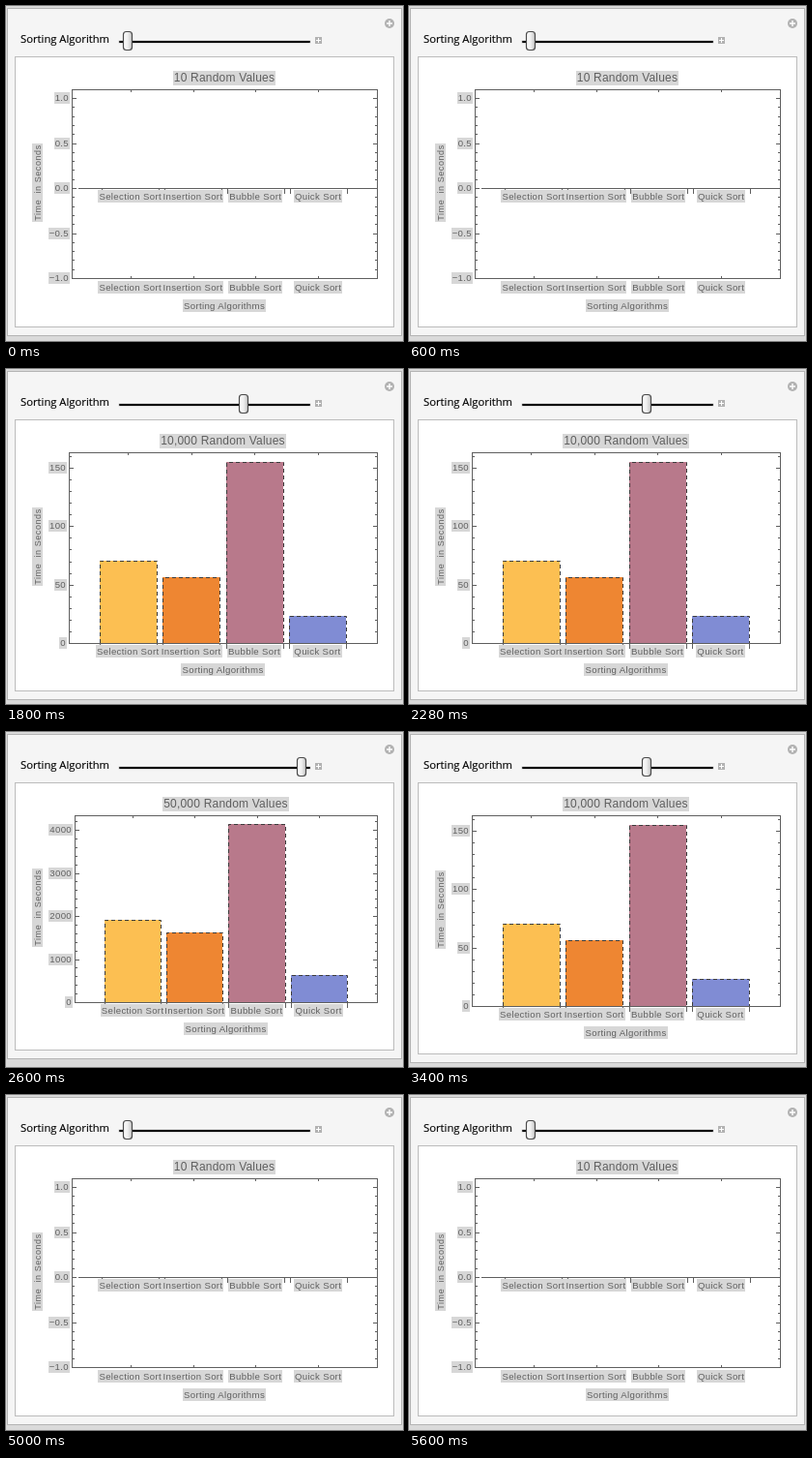
Animation of 411x346 px, one loop 6000 ms. Source, as an HTML page:

```html
<!DOCTYPE html>
<html lang="en">
<head>
<meta charset="utf-8">
<title>Sorting algorithm timings</title>
<style>
  html, body { margin: 0; width: 100%; height: 100%; overflow: hidden; background: #dadada; }
  svg { display: block; width: 411px; height: 346px; }
  text { font-family: "Liberation Sans", Arial, sans-serif; fill: #5f5f5f; white-space: pre; }
  .caption { font: 11.25px "Open Sans", "Noto Sans", sans-serif; fill: #000; stroke: #000; stroke-width: .15px; }
  .scene { visibility: hidden; animation: 6s step-end infinite; }
  .s0 { animation-name: show0; }
  .s1 { animation-name: show1; }
  .s2 { animation-name: show2; }
  .s3 { animation-name: show3; }
  @keyframes show0 {
    0%, 83.3333% { visibility: visible; }
    16.6667% { visibility: hidden; }
    100% { visibility: visible; }
  }
  @keyframes show1 {
    0%, 30%, 83.3333%, 100% { visibility: hidden; }
    16.6667%, 70% { visibility: visible; }
  }
  @keyframes show2 {
    0%, 43.3333%, 70%, 100% { visibility: hidden; }
    30%, 56.6667% { visibility: visible; }
  }
  @keyframes show3 {
    0%, 56.6667%, 100% { visibility: hidden; }
    43.3333% { visibility: visible; }
  }
</style>
</head>
<body>
<svg id="stage" viewBox="0 0 411 346">
  <defs>
    <linearGradient id="knob" x2="1" y2="0">
      <stop offset="0" stop-color="#fff"/>
      <stop offset=".5" stop-color="#eee"/>
      <stop offset="1" stop-color="#c4c4c4"/>
    </linearGradient>
  </defs>
</svg>
<script>
const RIGHT = 384, TOP = 86;
const INK = '#5f5f5f';
const names = ['Selection Sort', 'Insertion Sort', 'Bubble Sort', 'Quick Sort'];
const colors = ['#fcbf52', '#ee8632', '#b8798b', '#808cd4'];

// zero: y of value 0; unit: pixels per value; end: bottom of the white panel
const scenes = [
  { count: '10', knob: 126, left: 68, bottom: 281, end: 331, zero: 188, unit: 93,
    min: -1, max: 1, major: .5, minor: .1, digits: 1, bars: [0, 0, 0, 0] },
  { count: '1000', knob: 186, left: 62, bottom: 284, end: 334, zero: 284, unit: 125.4,
    min: 0, max: 1.55, major: .2, minor: .05, digits: 1, bars: [.7, .56, 1.5, .275] },
  { count: '10,000', knob: 246, left: 65, bottom: 283, end: 332, zero: 283, unit: 1.207,
    min: 0, max: 160, major: 50, minor: 10, digits: 0, bars: [70.5, 56, 155, 23] },
  { count: '50,000', knob: 306, left: 71, bottom: 279, end: 328, zero: 279, unit: .0445,
    min: 0, max: 4300, major: 1000, minor: 200, digits: 0, bars: [1900, 1610, 4125, 625] }
];

function add(parent, tag, attrs) {
  const node = document.createElementNS('http://www.w3.org/2000/svg', tag);
  for (const key in attrs) node.setAttribute(key, attrs[key]);
  return parent.appendChild(node);
}

function box(g, x1, y1, x2, y2, fill, stroke) {
  add(g, 'rect', { x: x1 + .5, y: y1 + .5, width: x2 - x1, height: y2 - y1, fill, stroke });
}

function path(g, d, attrs) {
  return add(g, 'path', { d, fill: 'none', stroke: INK, ...attrs });
}

// Text centred on (x, y), or ending at x, over a grey backdrop
function label(g, str, x, y, { size = 9.6, spacing = .036, end = false, angle = 0 } = {}) {
  const holder = add(g, 'g', angle ? { transform: `rotate(${angle} ${x} ${y})` } : {});
  const text = add(holder, 'text', {
    x, y: y + size * .346, 'font-size': size, 'letter-spacing': spacing * size,
    'text-anchor': end ? 'end' : 'middle'
  });
  text.textContent = str;
  const b = text.getBBox();
  const x1 = Math.round(b.x - 1), x2 = Math.round(b.x + b.width + 1);
  const y1 = Math.round(b.y - .5), y2 = Math.round(b.y + b.height + .8);
  const back = add(holder, 'rect', { x: x1, y: y1, width: x2 - x1, height: y2 - y1, fill: '#d7d7d7' });
  holder.insertBefore(back, text);
}

function drawControls(g, knob) {
  add(g, 'text', { x: 15, y: 38, class: 'caption' }).textContent = 'Sorting Algorithm';
  add(g, 'rect', { x: 116, y: 35, width: 200, height: 4, rx: 2, fill: '#ddd' });
  add(g, 'rect', { x: 117, y: 36, width: 198, height: 2, rx: 1, fill: '#000' });
  add(g, 'rect', { x: 121.5, y: 26.5, width: 9, height: 19, rx: 3, fill: 'url(#knob)',
    stroke: '#4a4a4a', 'stroke-width': 1.2, transform: `translate(${knob - 126})` });
  add(g, 'rect', { x: 320, y: 32, width: 7, height: 7, fill: '#b2b2b2' });
  path(g, 'M321 35.5h5M323.5 33v5', { stroke: '#fff' });
  add(g, 'circle', { cx: 397, cy: 18, r: 5, fill: '#b2b2b2' });
  path(g, 'M394 18h6M397 15v6', { stroke: '#fff', 'stroke-width': 1.4 });
}

function drawChart(g, s) {
  const { left, bottom, zero } = s;
  const width = RIGHT - left, middle = (left + RIGHT) / 2;
  const yOf = value => Math.round(zero - value * s.unit);
  const centers = names.map((_, i) => left + width * (.194 + .205 * i));
  const half = width * .093;
  const edges = centers.map(c => [Math.floor(c - half), Math.floor(c + half)]);

  box(g, left, TOP, RIGHT, bottom, 'none', INK);

  let ticks = '';
  const every = Math.round(s.major / s.minor);
  for (let i = Math.round(s.min / s.minor); i * s.minor <= s.max + s.minor / 100; i++) {
    const y = yOf(i * s.minor) + .5, len = i % every ? 3 : 5;
    if (y > TOP) ticks += `M${left} ${y}h${len}M${RIGHT + 1} ${y}h${-len}`;
  }
  for (const c of centers) ticks += `M${Math.floor(c) + .5} ${TOP}v3m0 ${bottom - TOP - 5}v3`;
  path(g, ticks);

  edges.forEach(([a, b], i) => {
    const y = yOf(s.bars[i]);
    path(g, `M${a + .5} ${zero}v6M${b + .5} ${zero}v6`);
    if (y === zero) return;
    add(g, 'rect', { x: a, y, width: b - a, height: zero - y, fill: colors[i] });
    path(g, `M${a + .5} ${zero}V${y + .5}H${b + .5}V${zero}`, { stroke: '#3c3c3c', 'stroke-dasharray': '4 3' });
  });
  path(g, `M${zero < bottom ? 75 : left} ${zero + .5}H${RIGHT}`);

  for (let i = Math.round(s.min / s.major); i * s.major <= s.max; i++) {
    const value = (i * s.major).toFixed(s.digits).replace('-', '−');
    label(g, value, left - 3, yOf(i * s.major), { end: true });
  }
  names.forEach((name, i) => {
    if (zero < bottom) label(g, name, centers[i] - .6, zero + 8.5);
    label(g, name, centers[i] - .6, s.end - 40.5);
  });
  label(g, s.count + ' Random Values', middle, 74, { size: 12, spacing: .017 });
  label(g, 'Sorting Algorithms', middle, s.end - 21.5);
  label(g, 'Time\u00a0 in Seconds', 32.5, (TOP + bottom) / 2 - 1, { size: 9, spacing: .065, angle: -90 });
}

const stage = document.getElementById('stage');
scenes.forEach((s, i) => {
  const g = add(stage, 'g', { class: `scene s${i}` });
  box(g, 1, 2, 409, s.end + 9, '#f5f5f5', '#b4b4b4');
  box(g, 9, 52, 401, s.end, '#fff', '#bcbcbc');
  drawControls(g, s.knob);
  drawChart(g, s);
});
</script>
</body>
</html>
```
